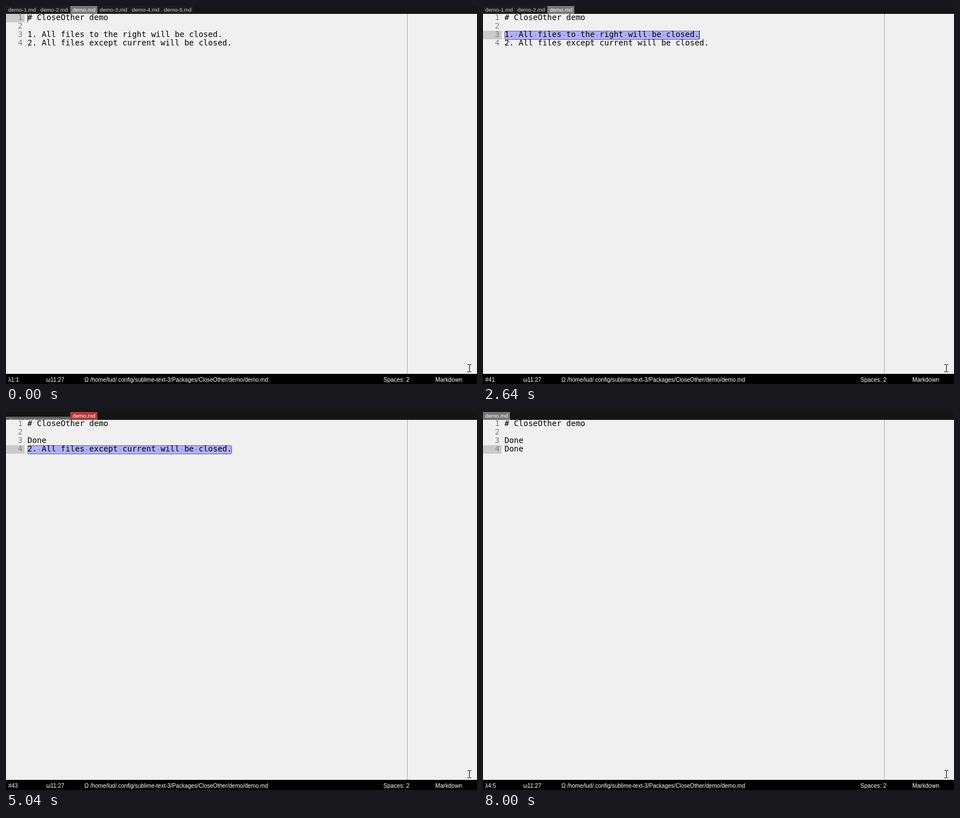
An HTML page with a canvas that plays this animation: 835 px wide and 671 px high, repeating every 8.08 s.

```html
<!DOCTYPE html>
<html lang="en">
<head>
<meta charset="utf-8">
<title>CloseOther demo</title>
<style>
html, body { margin: 0; width: 100%; height: 100%; overflow: hidden; background: #f0f0f0; }
canvas { display: block; }
</style>
</head>
<body>
<canvas id="stage" width="835" height="671"></canvas>
<script>
const ctx = document.getElementById('stage').getContext('2d');
const LOOP = 8080, STEP = 80;
const LEFT = 38, TOP = 14, LINE = 15;
const MONO = '14px "DejaVu Sans Mono", monospace';
const sans = size => size + 'px "Liberation Sans", Arial, sans-serif';
const FIRST = '1. All files to the right will be closed.';
const SECOND = '2. All files except current will be closed.';
const CLOSE_RIGHT = 2000, CLOSE_REST = 4960, SAVED = 6880;

ctx.font = MONO;
const CHAR = ctx.measureText('0').width;

// Editor input: [time, caret line, caret column, selected, typed text]
const steps = [
  [-380, 1, 0],
  [640, 2, 0],
  [800, 3, 0],
  [1040, 3, 41, true],
  [2800, 3, 1, false, 'D'],
  [3040, 3, 2, false, 'Do'],
  [3120, 3, 3, false, 'Don'],
  [3200, 3, 4, false, 'Done'],
  [3360, 4, 4],
  [3520, 4, 0],
  [3840, 4, 43, true],
  [5600, 4, 1, false, 'D'],
  [5760, 4, 2, false, 'Do'],
  [5840, 4, 4, false, 'Done']
];

const clamp = v => Math.max(0, Math.min(1, v));

function rect(x, y, w, h, color) {
  ctx.fillStyle = color;
  ctx.fillRect(x, y, w, h);
}

function text(str, x, y, font, color) {
  ctx.font = font;
  ctx.fillStyle = color;
  ctx.fillText(str, x, y);
}

function stateAt(t) {
  const lines = ['# CloseOther demo', '', FIRST, SECOND];
  let now = steps[0];
  for (const s of steps) {
    if (s[0] > t) break;
    now = s;
    if (s[4]) lines[s[1] - 1] = s[4];
  }
  const [since, line, col, selected] = now;
  return { since, line, col, selected, lines };
}

function caretAlpha(age) {
  if (age < 260) return 1;
  return clamp(0.5 + 0.8 * Math.cos((age - 260) / 720 * 2 * Math.PI));
}

function drawTab(label, x, w, drop, fill, ink) {
  if (drop >= 13) return;
  rect(x, drop, w, 14, fill);
  text(label, x + 4, 10 + drop, sans(9.7), ink);
}

function drawTabs(t) {
  rect(0, 0, 835, 14, '#151515');
  ctx.save();
  ctx.beginPath();
  ctx.rect(0, 0, 835, 14);
  ctx.clip();
  const closingRest = t >= CLOSE_REST;
  const restDrop = closingRest ? (t - CLOSE_REST + 40) * 0.07 : 0;
  for (let i = 0; i < 2; i++) {
    drawTab(`demo-${i + 1}.md`, i * 57, 57, restDrop, closingRest ? '#666' : '#1d1d1d', '#ccc');
  }
  const slide = clamp((t - CLOSE_REST - 80) / 240);
  const x = Math.round(114 * (1 - slide * slide * (3 - 2 * slide)));
  const dirty = t >= 2800 && t < SAVED;
  drawTab('demo.md', x, 48, 0, dirty ? '#b23a3a' : '#777', '#fff');

  const closing = t >= CLOSE_RIGHT;
  for (let i = 0; i < 3; i++) {
    const drop = closing ? (t - CLOSE_RIGHT) * (i ? 0.083 : 0.0813) - (i ? 0.6 : 1.5) : 0;
    drawTab(`demo-${i + 3}.md`, 162 + i * 57, 57, Math.max(0, drop * 1.2), closing && i < 2 ? '#666' : '#1d1d1d', '#ccc');
  }
  ctx.restore();
}

function drawSelection(str, y) {
  const w = str.length * CHAR;
  ctx.beginPath();
  ctx.roundRect(LEFT + 0.5, y + 0.5, Math.round(w) - 1, LINE, 2);
  ctx.fillStyle = '#b0b0ff';
  ctx.fill();
  ctx.strokeStyle = '#6868a8';
  ctx.lineWidth = 1;
  ctx.stroke();
  [...str].forEach((c, i) => {
    if (c === ' ') rect(LEFT + (i + 0.5) * CHAR - 0.8, y + 7, 1.6, 1.6, '#66668f');
  });
}

function drawEditor(s, t) {
  rect(0, TOP, 835, 639, '#f0f0f0');
  rect(711, TOP, 1, 639, '#aaa');
  const y = TOP + (s.line - 1) * LINE;
  rect(0, y, 33, LINE, '#cacaca');
  if (s.selected) drawSelection(s.lines[s.line - 1], y);
  s.lines.forEach((str, i) => {
    const base = TOP + i * LINE + 11;
    text(String(i + 1), 21, base, MONO, '#808080');
    text(str, LEFT, base, MONO, '#000');
  });
  ctx.globalAlpha = caretAlpha(t - s.since);
  rect(Math.floor(LEFT + s.col * CHAR), y, 1, LINE, '#000');
  ctx.globalAlpha = 1;
}

function drawStatus(s) {
  rect(0, 653, 835, 18, '#000');
  const put = (str, x, size = 10.05) => text(str, x, 667, sans(size), '#fff');
  put(s.selected ? '#' + s.col : `λ${s.line}:${s.col + 1}`, 4);
  put('ω11:27', 71);
  put('Ω /home/lud/.config/sublime-text-3/Packages/CloseOther/demo/demo.md', 139);
  put('Spaces: 2', 669, 10.4);
  put('Markdown', 761, 10.4);
}

function drawPointer() {
  rect(821, 637, 1, 12, '#000');
  for (const y of [636, 649]) {
    rect(818, y, 3, 1, '#000');
    rect(822, y, 3, 1, '#000');
  }
}

function draw(t) {
  const s = stateAt(t);
  drawEditor(s, t);
  drawTabs(t);
  drawStatus(s);
  drawPointer();
}

const start = performance.now();
function frame() {
  const t = (performance.now() - start) % LOOP;
  draw(Math.floor(t / STEP) * STEP);
  requestAnimationFrame(frame);
}
frame();
</script>
</body>
</html>
```
